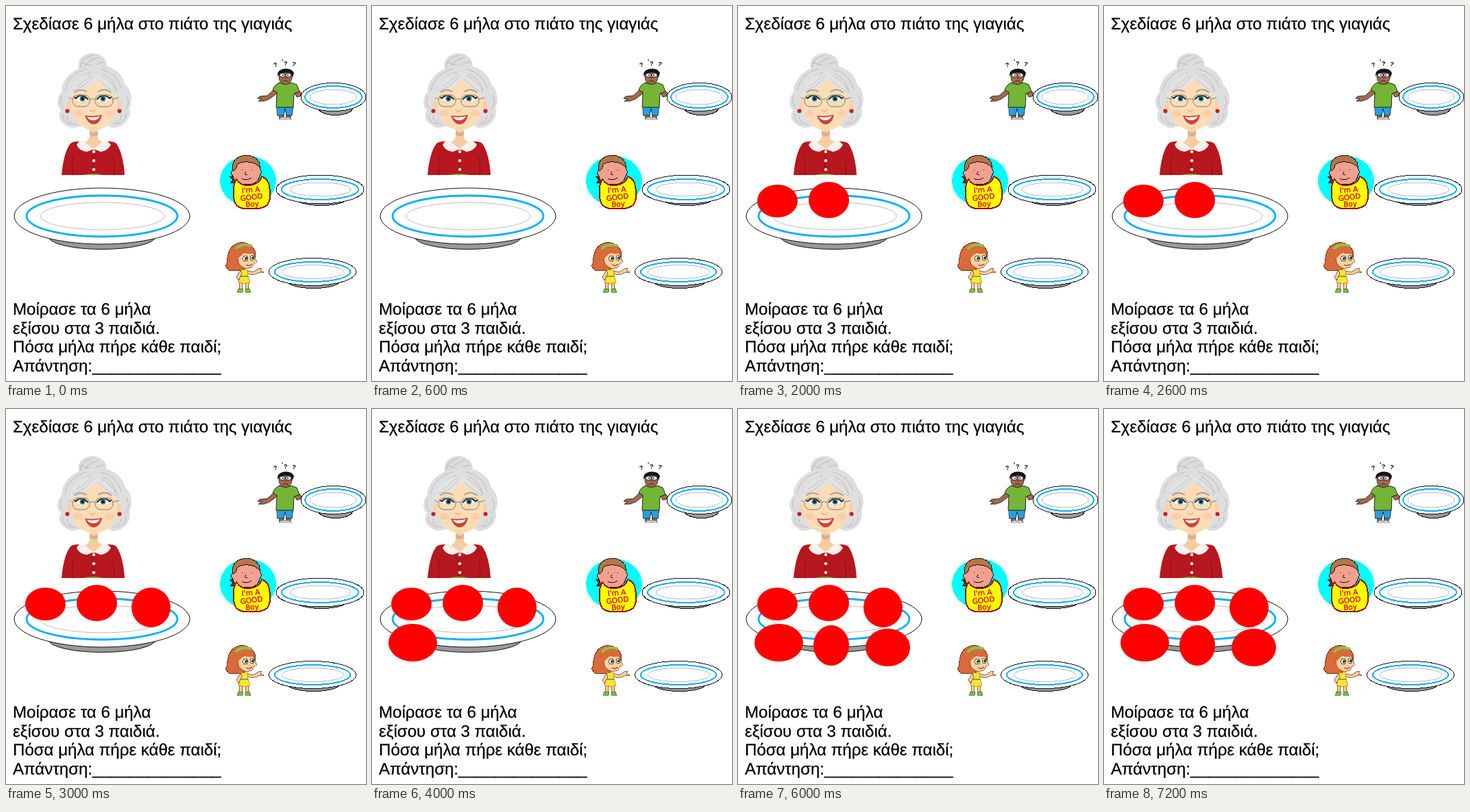
These frames come from a looping animation (525x548 px, 8000 ms). An HTML page:

```html
<!DOCTYPE html>
<html lang="el">
<head>
<meta charset="utf-8">
<title>6 μήλα</title>
<style>
html, body { margin: 0; width: 100%; height: 100%; overflow: hidden; background: #fff; }
svg { display: block; width: 525px; height: 548px; }
.words { font: 24.07px "Liberation Sans", Arial, sans-serif; fill: #000; stroke: #000; stroke-width: .25; text-rendering: geometricPrecision; }
.line { fill: none; stroke-linecap: round; stroke-linejoin: round; }
.ink { stroke: #111; stroke-linejoin: round; stroke-linecap: round; }
.crisp { shape-rendering: crispEdges; }
.bib { font: 10.5px "DejaVu Sans", sans-serif; fill: #e00c0c; stroke: #e00c0c; stroke-width: .4; text-anchor: middle; }
</style>
</head>
<body>
<svg viewBox="0 0 525 548">
  <rect width="525" height="548" fill="#fff"/>
  <g class="words">
    <text x="10" y="34">Σχεδίασε 6 μήλα στο πιάτο της γιαγιάς</text>
    <text x="10" y="451">Μοίρασε τα 6 μήλα</text>
    <text x="10" y="478.500">εξίσου στα 3 παιδιά.</text>
    <text x="10" y="506">Πόσα μήλα πήρε κάθε παιδί;</text>
    <text x="10" y="533.500">Απάντηση:______________</text>
  </g>

  <g id="grandma">
    <ellipse cx="126" cy="86" rx="20.500" ry="17" fill="#dcdcdc"/>
    <path class="line" stroke="#b8b8b8" d="M108 91Q109 75 126 72M113 94Q117 79 135 75M122 95Q129 83 143 82M109 83Q125 87 144 92"/>
    <path fill="#dedede" d="M127 86C150 84 170 96 174 115C182 122 186 137 180 149C184 160 175 174 163 177Q154 180 150 175L106 176Q95 181 87 174C78 170 75 160 80 152C72 145 75 132 81 126C81 104 102 88 127 86Z"/>
    <path class="line" stroke="#bababa" d="M86 124Q91 99 118 92M93 123Q100 104 123 97M138 92Q162 98 168 120M142 99Q157 107 162 125M81 132Q76 144 86 151M83 158Q81 170 95 173M89 161Q88 170 103 174M176 131Q182 143 174 152M175 157Q176 169 161 173M168 160Q169 168 156 173"/>
    <path fill="#f4cda3" d="M122 177H134V194Q138 198 146 200L128 212L111 200Q121 198 122 190Z"/>
    <path fill="#dfae86" d="M122 183Q129 187 134 183V188Q127 193 122 188Z"/>
    <ellipse cx="93" cy="145" rx="4" ry="7" fill="#f7d1aa"/>
    <ellipse cx="164" cy="145" rx="4" ry="7" fill="#f7d1aa"/>
    <path fill="#fcdcb4" d="M95 126C97 109 111 104 127 104C146 104 160 114 162 130C164 147 160 162 150 173Q129 190 108 174C97 164 93 148 95 126Z"/>
    <path fill="#e2e2e2" d="M91 135Q92 108 118 99Q147 94 164 132Q144 122 132 107Q116 124 97 127Z"/>
    <path class="line" stroke="#c0c0c0" d="M96 124Q116 119 128 101M103 117Q114 112 124 100M135 107Q145 118 161 127M139 102Q154 111 161 124"/>
    <ellipse cx="105" cy="157" rx="7" ry="5" fill="#fbcda9"/>
    <ellipse cx="151" cy="157" rx="7" ry="5" fill="#fbcda9"/>
    <path class="line" stroke="#a9a09a" stroke-width="2" d="M100 126Q108 120 117 125M135 125Q144 119 153 126"/>
    <path fill="#fff" d="M102 136Q111 126 119 137Q111 143 102 136ZM133 137Q141 126 151 136Q142 143 133 137Z"/>
    <g fill="#3d8ca0"><circle cx="111.500" cy="135.500" r="4"/><circle cx="141.500" cy="135.500" r="4"/></g>
    <g fill="#101820"><circle cx="111.500" cy="135.500" r="2.300"/><circle cx="141.500" cy="135.500" r="2.300"/></g>
    <path class="line" stroke="#222" stroke-width="2" d="M99 133L102 135Q109 126 119 136M133 136Q142 126 151 135L154 133"/>
    <g class="line" stroke="#999" stroke-width="1.300">
      <rect x="97" y="130" width="25" height="17" rx="8"/>
      <rect x="130" y="130" width="26" height="17" rx="8"/>
      <path d="M122 137Q126 134 130 137M97 136L92 134M156 136L164 134"/>
    </g>
    <path class="line" stroke="#e5b183" stroke-width="1.300" d="M122 152Q126 156 130 152"/>
    <path fill="#d2413c" d="M115 160Q127 162 140 159Q137 173 127 173Q119 172 115 160Z"/>
    <path fill="#fff" d="M118 162Q127 164 137 161Q134 167 127 167Q121 167 118 162Z"/>
    <path class="line" stroke="#edc097" d="M122 178Q127 180 132 178"/>
    <g fill="#c91b29"><circle cx="89.500" cy="153.500" r="3"/><circle cx="165.500" cy="153.500" r="3"/></g>
    <path fill="#b7171f" d="M81 247Q84 214 94 201Q99 197 112 198L128 211L143 198Q156 197 161 201Q171 216 173 247Z"/>
    <path fill="#f8f1ec" d="M111 196L128 209L143 196Q150 198 153 203Q148 212 138 213L128 209L118 213Q107 212 103 203Q105 198 111 196Z"/>
    <path class="line" stroke="#86131a" d="M127 212V247M98 220Q96 235 98 247M156 221Q159 234 157 247"/>
    <g fill="#f3e9e4"><circle cx="128" cy="213" r="2.300"/><circle cx="128" cy="226" r="2.300"/><circle cx="128" cy="239" r="2.300"/></g>
    <path fill="#80a530" d="M112 247Q127 243 142 247Z"/>
  </g>

  <g id="boy">
    <g font-family="Liberation Sans, Arial, sans-serif" font-weight="bold" font-size="9">
      <text x="390" y="89" transform="rotate(-15 393 86)">?</text>
      <text x="402" y="84">'</text>
      <text x="405" y="87">?</text>
      <text x="417" y="88" transform="rotate(12 419 85)">?</text>
    </g>
    <path fill="#a5694e" class="ink" stroke-width=".8" d="M392 121L381 131L370 132L367 135L373 136L368 139L376 139L384 136L396 127ZM422 120L431 127L429 132L424 133L420 126Z"/>
    <path fill="#a5694e" class="ink" stroke-width=".8" d="M399 158H405V165H399ZM409 158H415V165H409Z"/>
    <path fill="#279fe0" class="ink" stroke-width=".8" d="M395 144H419L417 160H409L407 150L405 160H396Z"/>
    <path fill="#74b536" class="ink" stroke-width=".9" d="M399 112Q407 116 416 112L424 115L428 125L420 128L419 148H394L395 126L389 123Q391 115 399 112Z"/>
    <ellipse cx="407.500" cy="104" rx="9.500" ry="10.500" fill="#a5694e" class="ink" stroke-width=".8"/>
    <path fill="#131313" d="M396 103Q395 94 404 92Q416 90 420 98L418 104L415 98Q406 96 399 99Z"/>
    <g fill="#fff" stroke="#111" stroke-width=".9"><ellipse cx="403" cy="101" rx="4" ry="3"/><ellipse cx="412" cy="101" rx="4" ry="3"/></g>
    <circle cx="404" cy="101" r="1"/><circle cx="411" cy="101" r="1"/>
    <path class="line ink" stroke-width=".8" d="M404 110Q408 108 411 110M407 105H409"/>
    <path fill="#ddd" stroke="#555" stroke-width=".5" d="M398 165L402 163H407V166H398ZM408 166V163H413L417 166Z"/>
  </g>

  <g id="baby" class="crisp">
    <ellipse cx="353" cy="255.500" rx="41" ry="36.500" fill="#0ff"/>
    <path fill="#9b1c1c" class="ink" d="M334 249L326 249L331 254L327 259L337 258Z"/>
    <path fill="#f2a08f" class="ink" d="M333 230Q340 219 354 220Q370 222 371 239Q374 244 370 248Q368 261 351 261Q333 261 331 249Q326 243 331 240Z"/>
    <path fill="#b5764a" class="ink" d="M331 241Q328 226 341 220Q359 214 369 228L371 237Q363 228 353 228Q342 227 337 232Q336 240 331 241Z"/>
    <path class="line ink" d="M344 239V240M358 239V240M350 242Q347 247 352 247M344 252Q350 256 358 251"/>
    <path fill="#ff0" stroke="#8c171c" stroke-width="2" d="M336 253Q343 264 356 262Q370 260 373 249Q383 253 384 264Q388 280 381 291Q371 298 356 296Q337 298 333 285Q329 265 336 253Z"/>
    <g class="bib">
      <text x="357" y="272" transform="rotate(-5 357 268)">I'm A</text>
      <text x="358" y="283" transform="rotate(-7 358 279)">GOOD</text>
      <text x="359" y="293" transform="rotate(-4 359 289)">Boy</text>
    </g>
  </g>

  <g id="girl" class="crisp">
    <path fill="#ffcf9f" stroke="#7a3d1c" stroke-width=".8" d="M352 387L361 389L368 384L373 383L371 387L376 389L368 390L361 393L351 391ZM341 403H345L344 414H340ZM349 403H353L354 414H350Z"/>
    <path fill="#d96a3a" stroke="#7a2f14" d="M323 368Q325 350 340 346Q357 344 363 358Q365 364 362 372L350 383Q338 389 325 386L320 380Q323 376 323 368Z"/>
    <path fill="#ffcf9f" stroke="#7a3d1c" stroke-width=".8" d="M338 365Q345 359 361 361L364 370Q367 374 362 376Q358 385 348 383Q337 380 338 365Z"/>
    <path fill="#d96a3a" d="M335 371Q333 354 346 351Q359 349 363 361Q352 364 347 360Q342 367 335 371Z"/>
    <path class="line" stroke="#8cc34a" stroke-width="4" d="M336 354Q343 347 357 350"/>
    <g fill="#fff" stroke="#222" stroke-width=".8"><ellipse cx="349" cy="369" rx="3.500" ry="4"/><ellipse cx="359" cy="368" rx="3" ry="4"/></g>
    <g fill="#26571c"><circle cx="350" cy="369" r="2"/><circle cx="360" cy="368" r="2"/></g>
    <path class="line" stroke="#b33622" stroke-width="1.200" d="M350 378Q355 381 359 377"/>
    <path fill="#ffe433" stroke="#b58a16" stroke-width=".8" d="M342 385H352L353 394L356 404Q348 407 339 404L342 394Z"/>
    <path class="line" stroke="#79ad32" stroke-width="2" d="M342 395H353"/>
    <path fill="#ffcf9f" stroke="#7a3d1c" stroke-width=".8" d="M342 386L336 396L339 401L344 391Z"/>
    <path fill="#7fc23f" stroke="#3d6a1c" stroke-width=".8" d="M339 413H345V418H337ZM350 413H355L357 418H349Z"/>
  </g>

  <g id="plates"></g>
  <g id="apples" fill="#f00"></g>
</svg>
<script>
const LOOP = 8000, STEP = 1000;

function ellipse(parent, [cx, cy, rx, ry], attrs = {}) {
  const el = document.createElementNS("http://www.w3.org/2000/svg", "ellipse");
  for (const [key, value] of Object.entries({ cx, cy, rx, ry, ...attrs })) el.setAttribute(key, value);
  return parent.appendChild(el);
}

// foot, rim, blue ring, inner ring
const plates = [
  { foot: [140, 337, 78, 18.5], rim: [140, 307, 128, 41], ring: [140, 307, 110, 30], well: [140.5, 307, 90.5, 20], blue: 2.8 },
  { foot: [480.5, 149, 25, 10.5], rim: [477.5, 133, 47.5, 20.5], ring: [477.5, 133, 41.5, 16], well: [477, 133, 34, 11], blue: 2, edge: "crisp" },
  { foot: [460, 282, 36, 9.5], rim: [458, 268, 64, 21], ring: [458, 268, 56, 15], well: [458.5, 268, 44.5, 10], blue: 2, edge: "crisp" },
  { foot: [448.5, 403, 37, 9.5], rim: [447, 388.5, 63.5, 20], ring: [447, 388.5, 55, 14.5], well: [447.5, 388.5, 45.5, 10], blue: 2, edge: "crisp" }
];
const plateLayer = document.getElementById("plates");
for (const { foot, rim, ring, well, blue, edge = "" } of plates) {
  const draw = (shape, fill, stroke, width) =>
    ellipse(plateLayer, shape, { fill, stroke, "stroke-width": width, class: edge });
  draw(foot, "#999", "#111", 1);
  draw(rim, "#fff", "#111", 1);
  draw(ring, "none", "#08b1f5", blue);
  draw(well, "none", "#aaa", 0.8);
}

const apples = [
  [57.5, 285, 29.5, 24],
  [132.5, 283.5, 29.5, 26.5],
  [211.5, 290, 28.5, 29],
  [59.5, 341.5, 35.5, 27.5],
  [136, 345.5, 26, 29.5],
  [218.5, 348.5, 32.5, 27.5]
];
const appleLayer = document.getElementById("apples");
apples.forEach((shape, i) => {
  const offset = (i + 1) * STEP / LOOP;
  ellipse(appleLayer, shape).animate(
    [{ opacity: 0 }, { opacity: 0, offset }, { opacity: 1, offset }, { opacity: 1 }],
    { duration: LOOP, iterations: Infinity }
  ).startTime = 0;
});
</script>
</body>
</html>
```
